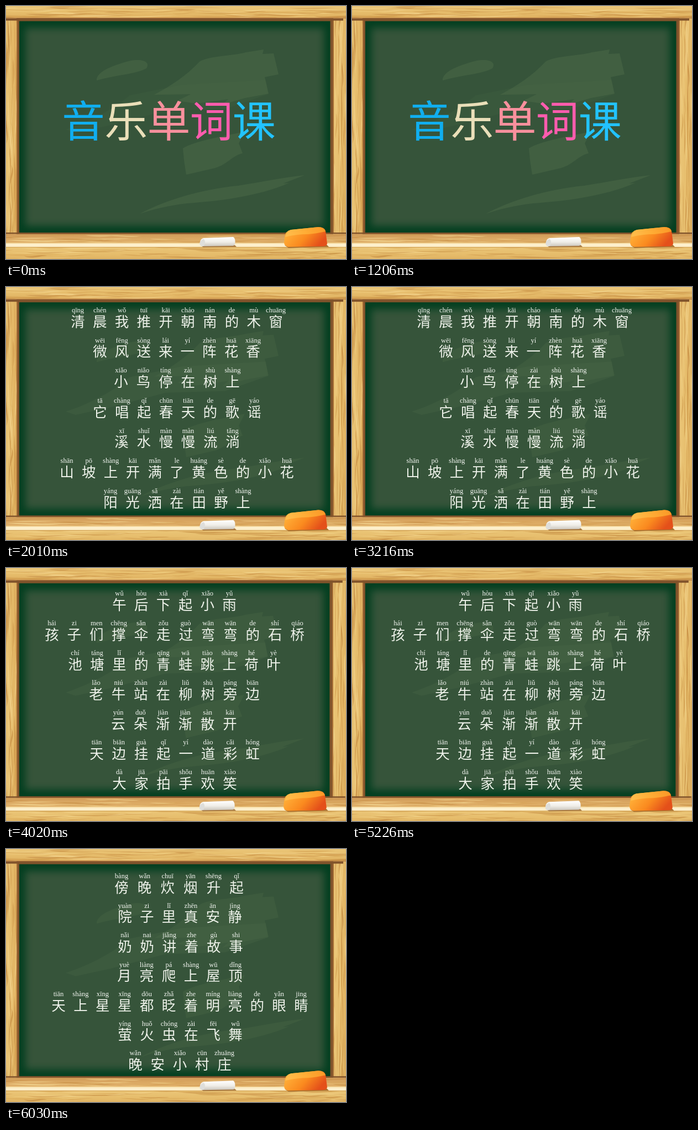
Recreate the animation shown at these times as an HTML page with a canvas. Size 615 px wide and 459 px high, loop 8.04 s.

```html
<!DOCTYPE html>
<html lang="zh-CN">
<head>
<meta charset="utf-8">
<title>音乐单词课</title>
<style>
html, body { margin: 0; width: 100%; height: 100%; overflow: hidden; background: #e4b968; }
canvas { display: block; }
</style>
</head>
<body>
<canvas id="stage" width="615" height="459"></canvas>
<script>
const W = 615, H = 459, HOLD = 2010;
const ctx = document.getElementById('stage').getContext('2d');
const HAN = '"Noto Sans CJK SC", "Noto Sans CJK", sans-serif';
const LATIN = '"Liberation Serif", "Noto Serif", serif';

const title = [['音', '#10aeef'], ['乐', '#eadfb9'], ['单', '#f9909d'], ['词', '#ff5cae'], ['课', '#22c3ff']];

// Each row: centre of the first character, centre of the last, characters, pinyin.
const scenes = [
  { sx: 1, sy: 1 },
  { sx: 1, sy: 1.009, top: 63, rows: [
    [130, 488, '清晨我推开朝南的木窗', 'qīng chén wǒ tuī kāi cháo nán de mù chuāng'],
    [170, 447, '微风送来一阵花香', 'wēi fēng sòng lái yí zhèn huā xiāng'],
    [208, 410, '小鸟停在树上', 'xiǎo niǎo tíng zài shù shàng'],
    [170, 449, '它唱起春天的歌谣', 'tā chàng qǐ chūn tiān de gē yáo'],
    [209, 410, '溪水慢慢流淌', 'xī shuǐ màn màn liú tǎng'],
    [110, 508, '山坡上开满了黄色的小花', 'shān pō shàng kāi mǎn le huáng sè de xiǎo huā'],
    [189, 429, '阳光洒在田野上', 'yáng guāng sǎ zài tián yě shàng']] },
  { sx: 0.998, sy: 1.008, top: 67, rows: [
    [205, 404, '午后下起小雨', 'wǔ hòu xià qǐ xiǎo yǔ'],
    [83, 527, '孩子们撑伞走过弯弯的石桥', 'hái zi men chēng sǎn zǒu guò wān wān de shí qiáo'],
    [125, 484, '池塘里的青蛙跳上荷叶', 'chí táng lǐ de qīng wā tiào shàng hé yè'],
    [163, 446, '老牛站在柳树旁边', 'lǎo niú zhàn zài liǔ shù páng biān'],
    [203, 405, '云朵渐渐散开', 'yún duǒ jiàn jiàn sàn kāi'],
    [164, 446, '天边挂起一道彩虹', 'tiān biān guà qǐ yí dào cǎi hóng'],
    [205, 405, '大家拍手欢笑', 'dà jiā pāi shǒu huān xiào']] },
  { sx: 1, sy: 1.003, top: 70, rows: [
    [209, 417, '傍晚炊烟升起', 'bàng wǎn chuī yān shēng qǐ'],
    [215, 414, '院子里真安静', 'yuàn zi lǐ zhēn ān jìng'],
    [215, 416, '奶奶讲着故事', 'nǎi nai jiǎng zhe gù shi'],
    [214, 415, '月亮爬上屋顶', 'yuè liàng pá shàng wū dǐng'],
    [95, 534, '天上星星都眨着明亮的眼睛', 'tiān shàng xīng xīng dōu zhǎ zhe míng liàng de yǎn jing'],
    [215, 415, '萤火虫在飞舞', 'yíng huǒ chóng zài fēi wǔ'],
    [234, 395, '晚安小村庄', 'wǎn ān xiǎo cūn zhuāng']] }
];

function random(seed) {
  return () => (seed = (seed * 16807) % 2147483647) / 2147483647;
}

function box(x, y, w, h, fill) {
  ctx.fillStyle = fill;
  ctx.fillRect(x, y, w, h);
}

function shape(path, fill) {
  ctx.fillStyle = fill;
  ctx.fill(new Path2D(path));
}

function gradient(x0, y0, x1, y1, ...colors) {
  const g = ctx.createLinearGradient(x0, y0, x1, y1);
  colors.forEach((c, i) => g.addColorStop(i / (colors.length - 1), c));
  return g;
}

// A plank lying along x, with tapered wavy streaks.
function plank(length, depth, seed, count, tones) {
  const rnd = random(seed);
  ctx.save();
  ctx.beginPath();
  ctx.rect(0, 0, length, depth);
  ctx.clip();
  box(0, 0, length, depth, gradient(0, 0, 0, depth, ...tones));
  for (let i = 0; i < count; i++) {
    const x = rnd() * length * 1.1 - 40, y = rnd() * depth;
    const l = 35 + rnd() * 85, t = 1 + rnd() * 2, b = rnd() * 8 - 4;
    ctx.globalAlpha = 0.3 + rnd() * 0.4;
    shape(`M${x} ${y}C${x + l * .3} ${y + b} ${x + l * .7} ${y - b} ${x + l} ${y}
           C${x + l * .7} ${y - b + t} ${x + l * .3} ${y + b + t * 1.5} ${x} ${y}Z`,
      ['#c48a40', '#f5d994', '#cf9a4c'][i % 3]);
  }
  ctx.restore();
}

const GOLD = ['#ebc678', '#e6bd6c', '#dfb05f'];
const TAN = ['#cf9a57', '#dba963', '#e0b06a'];

function plankAt(x, y, length, depth, seed, count, tones = GOLD, upright = false) {
  ctx.save();
  ctx.translate(x, y);
  if (upright) ctx.transform(0, 1, 1, 0, 0, 0);
  plank(length, depth, seed, count, tones);
  ctx.restore();
}

function drawBoard(plain) {
  box(19, 22, 573, 392, '#80532b');
  box(24, 27.5, 562.5, 383.5, '#033f20');
  ctx.save();
  ctx.beginPath();
  ctx.rect(24, 27.5, 562.5, 383.5);
  ctx.clip();
  ctx.filter = 'blur(7px)';
  box(35, 40, 540, 359, '#36543a');
  ctx.filter = 'none';

  ctx.globalAlpha = plain ? 0.5 : 0.3;
  const chalk = '#4d6a48';
  shape('M164 132C168 117 195 107 226 99C250 95 261 103 254 113C238 123 205 124 164 135Z', chalk);
  shape('M268 161C298 145 327 126 350 101C367 90 410 91 434 84L466 79L464 87L484 86L493 124L468 129L475 159L432 167L391 179L402 169L345 177L310 172L334 160Z', chalk);
  shape('M242 377C286 353 354 332 420 326C464 319 500 311 540 307L501 322L512 321C452 347 380 354 328 358C293 362 269 368 242 377Z', chalk);
  shape('M320 258C344 244 395 236 432 228L421 249L428 267C407 273 401 287 378 294L326 306L322 280Z', chalk);
  ctx.globalAlpha = plain ? 0.16 : 0.28;
  shape('M108 224C160 207 196 185 224 162L318 143L470 134L474 160L396 187L289 190L190 216L126 230Z', chalk);
  ctx.restore();
}

function drawLedge() {
  plankAt(-5, 413.5, 630, 17, 71, 50, TAN);
  box(-5, 429.5, 630, 2, '#f3d595');
  box(-5, 431, 630, 6, '#fdefcb');
  plankAt(-5, 437, 630, 25, 93, 70);
  box(-5, 437, 630, 1.2, '#d4a65a');

  // chalk stick
  shape('M352 434L414 434L417 437L357 438Z', '#a97b43');
  shape('M351 428Q352 422 358 421L411 419Q416 422 414 433L411 435L355 436Q349 434 351 428Z',
    gradient(0, 419, 0, 437, '#ffffff', '#f0eee8', '#c6c1b8'));
  shape('M351 428Q354 423 358 423Q362 428 358 435L354 436Q349 434 351 428Z', '#dededb');

  // sponge
  shape('M504 434L580 433L584 437L511 439Z', '#a9702f');
  shape('M504 420Q505 408 515 406L565 401Q576 401 578 408L581 431Q580 436 573 436L510 437Q503 435 503 429Z',
    gradient(520, 404, 560, 440, '#ffab35', '#fa8a1f', '#e4501a'));
  shape('M505 419Q507 408 516 406L565 401Q575 401 578 409Q561 413 546 414Q525 414 505 419Z',
    gradient(508, 418, 574, 402, '#ffbd4c', '#ffad36', '#fb9a28'));
}

function drawScenery(scene, plain) {
  ctx.save();
  ctx.scale(scene.sx, scene.sy);
  box(-5, 0, 630, H, '#e4b968');
  drawBoard(plain);
  plankAt(-2, 24, 390, 21, 17, 62, GOLD, true);
  plankAt(592, 24, 390, 26, 39, 62, GOLD, true);
  box(19, 24, 2, 389, '#a66d35');
  box(591, 24, 2, 389, '#a66d35');
  plankAt(-5, 0, 630, 22, 53, 82);
  box(-5, 21, 630, 1.5, '#b98145');
  box(0, 22.5, 610, 4, '#80532b');
  box(0, 411, 615, 2.5, '#80532b');
  drawLedge();
  ctx.restore();
}

function text(str, x, y, font, color) {
  ctx.font = font;
  ctx.fillStyle = color;
  ctx.fillText(str, x, y);
}

function drawTitle() {
  title.forEach(([ch, color], i) => text(ch, 140 + i * 77.2, 238, `500 78px ${HAN}`, color));
}

function drawRows({ top, rows }) {
  const pitch = (391 - top) / 6;
  rows.forEach(([first, last, han, pinyin], r) => {
    const chars = [...han], y = top + r * pitch;
    const step = (last - first) / (chars.length - 1);
    pinyin.split(' ').forEach((sound, i) => {
      const x = first + i * step;
      text(sound, x, y - 17, `12.5px ${LATIN}`, '#f4f7f2');
      text(chars[i], x, y + 8.5, `300 25.5px ${HAN}`, '#eef2ea');
    });
  });
}

let shown = -1;
const start = performance.now();

function tick() {
  const now = Math.max(0, performance.now() - start);
  const index = Math.floor(now / HOLD) % scenes.length;
  if (index !== shown) {
    shown = index;
    const scene = scenes[index];
    ctx.clearRect(0, 0, W, H);
    ctx.textAlign = 'center';
    ctx.textBaseline = 'alphabetic';
    drawScenery(scene, !scene.rows);
    if (scene.rows) drawRows(scene);
    else drawTitle();
  }
  requestAnimationFrame(tick);
}
tick();
</script>
</body>
</html>
```
